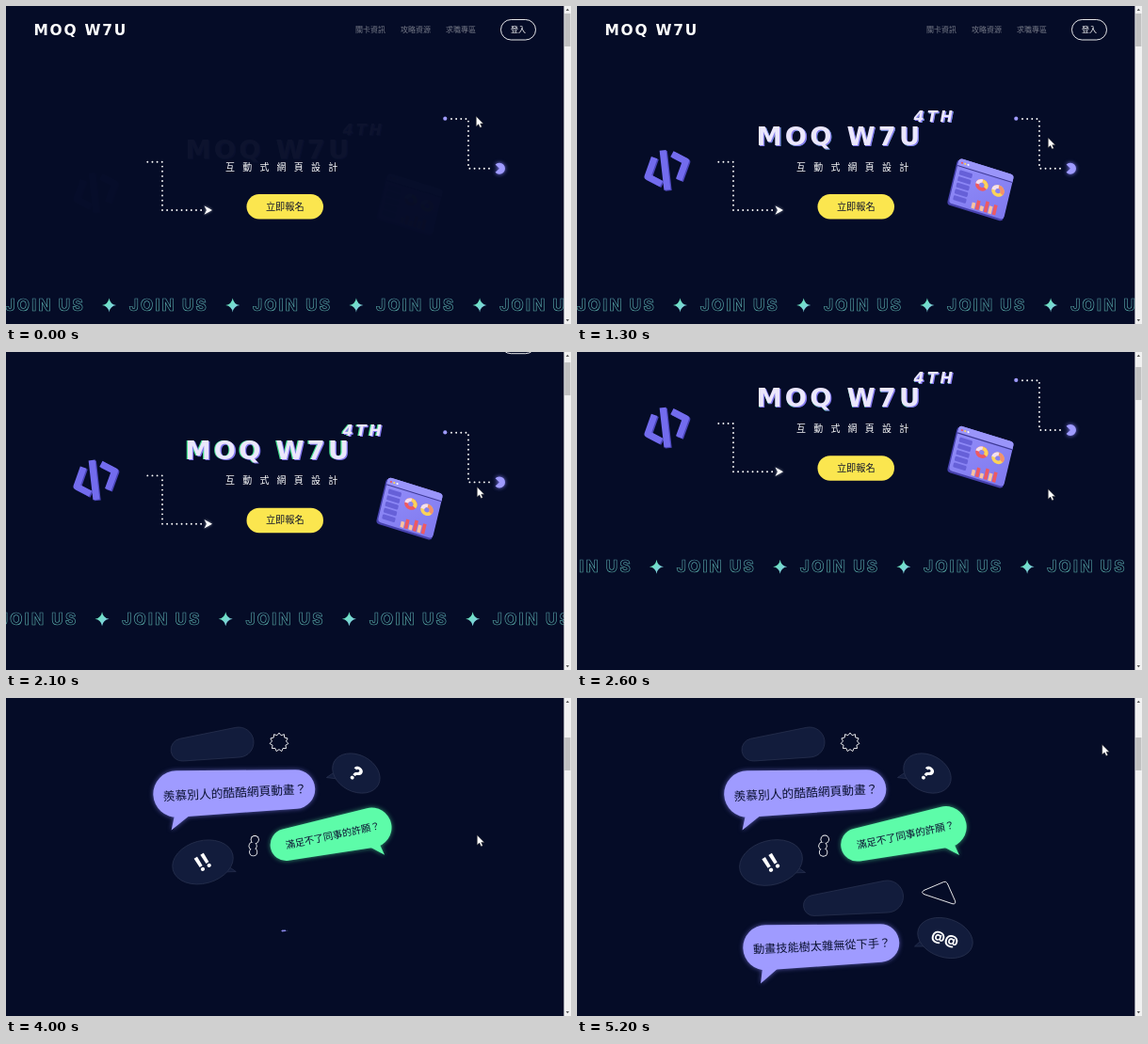
Recreate the animation shown at these times as an HTML page. Size 600 by 338 pixels, loop 5300 ms.

```html
<!DOCTYPE html>
<html lang="zh-Hant">
<head>
<meta charset="utf-8">
<title>互動式網頁設計</title>
<style>
  html, body { margin: 0; width: 100%; height: 100%; overflow: hidden; background: #050c27; }
  svg { display: block; width: 600px; height: 338px; }
  text { font-family: "Noto Sans CJK TC", "Noto Sans CJK", "Noto Sans CJK JP", sans-serif; }
  .wide, .wide text { font-family: "DejaVu Sans", sans-serif; font-weight: 700; }
  .join { font: 800 17px Inter, sans-serif; letter-spacing: 2.3px; fill: none; stroke: url(#edge); stroke-width: .65; }
  .mid { text-anchor: middle; }
  .nav { font-size: 8px; fill: #777b89; }
  .mark { font-family: Inter, sans-serif; font-weight: 800; fill: #fff; text-anchor: middle; }
  .grey { fill: #121c3c; stroke: #27304e; stroke-width: .8; }
  .line { fill: none; stroke: #fff; stroke-width: .9; stroke-linejoin: round; }
  .dots { fill: none; stroke: #fff; stroke-width: 1.9; stroke-linecap: round; stroke-dasharray: 0 5.15; }
  .violet { fill: #9f9bff; filter: drop-shadow(0 0 2.5px #807cf0aa); }
  .green { fill: #5dfca9; filter: drop-shadow(0 0 2.5px #45d890aa); }
  .say { fill: #0b1232; text-anchor: middle; font-weight: 400; }
  .code { fill: none; stroke-width: 7; stroke-linecap: square; stroke-linejoin: round; }
</style>
</head>
<body>
<svg viewBox="0 0 600 338">
  <defs>
    <linearGradient id="mint" x1="0" y1="0" x2="1" y2="1">
      <stop offset="0" stop-color="#5cf0ac"/><stop offset="1" stop-color="#8fc4f2"/>
    </linearGradient>
    <linearGradient id="edge" x1="0" y1="0" x2="0" y2="1">
      <stop offset="0" stop-color="#4f929f"/><stop offset="1" stop-color="#5bb5ab"/>
    </linearGradient>
    <linearGradient id="iris" x1="0" y1="0" x2="1" y2="1">
      <stop offset="0" stop-color="#938efa"/><stop offset="1" stop-color="#7f79ee"/>
    </linearGradient>
    <path id="brackets" d="M81 164.5L75 181.5L86.5 187.5M104 159L115.5 165L109.5 181.5M91.5 157L95.5 192"/>
    <g id="name" class="wide">
      <text x="190.5" y="148.2" font-size="27.3" letter-spacing="3.2">MOQ W7U</text>
      <text x="357.5" y="123.2" font-size="16" font-style="italic" letter-spacing="3">4TH</text>
    </g>
  </defs>

  <g id="page">
    <text class="wide" x="29.5" y="31" font-size="15.4" letter-spacing="1.8" fill="#fff">MOQ W7U</text>
    <text class="nav" x="371" y="28.3">關卡資訊</text>
    <text class="nav" x="419" y="28.3">攻略資源</text>
    <text class="nav" x="467" y="28.3">求職專區</text>
    <rect x="525.5" y="14.5" width="37" height="21.5" rx="10.75" class="line"/>
    <text class="mid" x="544" y="28.3" font-size="8" fill="#fff">登入</text>

    <g id="title">
      <use href="#name" id="ghostA" fill="#46e08e"/>
      <use href="#name" id="ghostB" fill="#8478ee"/>
      <use href="#name" fill="#ebe7fc"/>
    </g>
    <text x="233" y="174.7" font-size="10" font-weight="500" letter-spacing="8.2" fill="#fff">互動式網頁設計</text>
    <rect x="255.5" y="200" width="81.5" height="26.5" rx="13.25" fill="#fbe64f"/>
    <text class="mid" x="296.3" y="216.7" font-size="10.2" font-weight="500" fill="#10152c">立即報名</text>

    <path class="dots" d="M150.3 165.7H166V217H209"/>
    <path d="M210.5 212.3L219 217L210.5 221.7L213 217Z" fill="#fff" style="filter:drop-shadow(0 0 1.5px #fff8)"/>
    <path class="dots" d="M473 120H491V172.7H516"/>
    <circle cx="466.3" cy="119.7" r="2.1" fill="#9f9bff"/>
    <path d="M524 172.7L519.6 168.6A6 6 0 1 1 519.6 176.8Z" fill="#9f9bff" style="filter:drop-shadow(0 0 2px #7f7af0)"/>

    <g id="codeIcon" class="code">
      <use href="#brackets" x="1.3" y="1" stroke="#4a45b8"/>
      <use href="#brackets" stroke="#736cee"/>
    </g>
    <g id="windowIcon"><g id="panel" transform="matrix(.97 .3 -.21 .88 406 161.5)">
      <rect x="-1.5" y="1.5" width="61" height="55" rx="4" fill="#4742ae"/>
      <rect width="60" height="54" rx="4" fill="url(#iris)"/>
      <path d="M0 9V4A4 4 0 0 1 4 0H56A4 4 0 0 1 60 4V9Z" fill="#9a95fa"/>
      <path d="M0 9H60" stroke="#3d3996" stroke-width="1.2"/>
    </g></g>

    <g id="marquee"></g>
  </g>

  <g id="row0"></g><g id="row1"></g><g id="row2"></g>

  <rect x="592.4" width="7.6" height="338" fill="#f1f1f1"/>
  <path d="M594.6 5L596.3 2.8L598 5ZM594.6 333L596.3 335.2L598 333Z" fill="#555"/>
  <rect id="thumb" x="593.2" y="8" width="6.2" height="35" fill="#c1c1c1"/>
  <path id="cursor" d="M0 0V10.6L2.5 8.4L4.2 12L6 11.2L4.4 7.7H7.6Z" fill="#fff" stroke="#222" stroke-width=".5"/>
</svg>

<script>
const LOOP = 5300;
const $ = id => document.getElementById(id);
const add = (id, html) => $(id).insertAdjacentHTML('beforeend', html);
const move = (id, x, y) => $(id).setAttribute('transform', `translate(${x} ${y})`);

// Outline around two circles joined by their outer tangents.
function capsule(x1, y1, r1, x2, y2, r2) {
  const a = Math.atan2(y2 - y1, x2 - x1);
  const b = Math.acos((r1 - r2) / Math.hypot(x2 - x1, y2 - y1));
  const at = (x, y, r, k) => `${x + r * Math.cos(k)} ${y + r * Math.sin(k)}`;
  return `M${at(x1, y1, r1, a - b)}L${at(x2, y2, r2, a - b)}` +
    `A${r2} ${r2} 0 ${+(r2 > r1)} 1 ${at(x2, y2, r2, a + b)}` +
    `L${at(x1, y1, r1, a + b)}A${r1} ${r1} 0 ${+(r1 > r2)} 1 ${at(x1, y1, r1, a - b)}Z`;
}

const star = (x, y, points, outer, inner) => 'M' + Array.from({ length: points * 2 }, (_, i) => {
  const r = i % 2 ? inner : outer, a = i * Math.PI / points - Math.PI / 2;
  return `${x + r * Math.cos(a)} ${y + r * Math.sin(a)}`;
}).join('L') + 'Z';

const path = (cls, d) => `<path class="${cls}" d="${d}"/>`;
const label = (cls, x, y, size, angle, str) =>
  `<text class="${cls}" font-size="${size}" transform="translate(${x} ${y}) rotate(${angle})" y="${size * .37}">${str}</text>`;
const speech = (cls, ends, tail, ...text) =>
  `<g class="${cls}"><path d="${capsule(...ends)}"/><path d="${tail}"/></g>` + label('say', ...text);
const thought = (x, y, rx, ry, angle, tail, size, turn, str) => path('grey', tail) +
  `<ellipse class="grey" rx="${rx}" ry="${ry}" transform="translate(${x} ${y}) rotate(${angle})"/>` +
  label('mark', x, y, size, turn, str);

add('row0',
  path('grey', capsule(187, 55, 12, 247, 47, 16)) +
  path('line', star(290, 47, 11, 10, 7.6)) +
  thought(372, 80, 26.5, 19.5, 27, 'M350 78L340.5 84.5L352 86Z', 21, 38, '?') +
  speech('violet', [181, 102, 24.8, 307.5, 97, 20.8], 'M179 124L175.5 140.5L196 124Z',
    243, 100.5, 12.75, -3, '羨慕別人的酷酷網頁動畫？'));

const worm = [[263.2, 150.3], [261, 157.2], [261.6, 164]];
const blobs = (r, fill) => worm.map(([x, y]) => `<circle cx="${x}" cy="${y}" r="${r}" fill="${fill}"/>`).join('');
add('row1',
  thought(206, 175, 34, 23.5, -15, 'M233 179L242.5 185.5L226 186Z', 23, -32, '!!') +
  blobs(4.7, '#fff') + blobs(3.8, '#050c27') +
  speech('green', [297.8, 156, 17.6, 391.7, 137, 22], 'M385 156L406 167L400 154Z',
    349, 145.5, 10.6, -12, '滿足不了同事的許願？'));

add('row2',
  path('grey', capsule(251.5, 220.5, 11, 329.5, 211, 17)) +
  path('line', 'M368 204.6L389.5 195.5Q392 194.6 393.3 197L401.6 215.8Q402.4 219.2 399 218.8L368 208.4Q365 206.4 368 204.6Z') +
  thought(391, 255, 30, 20.5, 18, 'M366 257L358.5 264L370 264Z', 14, 17, '@@') +
  speech('violet', [200.3, 265.3, 24, 322, 260.5, 20.3], 'M197 287L195 303.5L215 286Z',
    260, 263.5, 12.2, -2.8, '動畫技能樹太雜無從下手？'));

// Dashboard details
let parts = '';
for (let i = 0; i < 3; i++) parts += `<circle cx="${4 + i * 3.4}" cy="4.5" r="1.1" fill="${['#f0575f', '#fbd35a', '#fff'][i]}"/>`;
for (let i = 0; i < 5; i++) parts += `<rect x="3.5" y="${13 + i * 7.6}" width="14" height="5.6" rx="1.2" fill="#6660d8"/>`;
[[29.5, 22.5, '#ee5a62', '#fbd35a'], [47.3, 23.5, '#fbd35a', '#f4916a']].forEach(([x, y, a, b]) => {
  parts += `<g fill="none" stroke-width="4" transform="translate(${x} ${y})"><circle r="4.8" stroke="${a}"/>` +
    `<path d="M0-4.8A4.8 4.8 0 0 1 4.2 2.3" stroke="${b}"/><path d="M-4.8 0A4.8 4.8 0 0 1 0-4.8" stroke="#f3dff0"/></g>`;
});
[7, 11, 6, 13, 9, 12].forEach((h, i) => {
  parts += `<rect x="${24 + i * 4.6}" y="${52 - h}" width="3.6" height="${h}" fill="${i % 2 ? '#ee5a62' : '#fbc3a0'}"/>`;
});
add('panel', parts);

for (let i = 0; i < 7; i++) {
  const x = i * 131.2;
  add('marquee', `<text class="join" x="${x - .5}" y="324">JOIN US</text>` +
    `<path d="M${x + 109.5} 310.5q1 6.5 7.5 7.5q-6.5 1-7.5 7.5q-1-6.5-7.5-7.5q6.5-1 7.5-7.5Z" fill="url(#mint)"/>`);
}

// Linear interpolation through [time, value] stops.
function track(t, stops) {
  if (t <= stops[0][0]) return stops[0][1];
  for (let i = 1; i < stops.length; i++) {
    const [t0, v0] = stops[i - 1], [t1, v1] = stops[i];
    if (t < t1) return v0 + (v1 - v0) * (t - t0) / (t1 - t0);
  }
  return stops[stops.length - 1][1];
}

const clamp = v => Math.min(1, Math.max(0, v));
const smooth = v => v * v * (3 - 2 * v);
const elastic = p => p <= 0 ? 0 : p >= 1 ? 1 : 1 - 2 ** (-10 * p) * Math.cos(4 * Math.PI * p);

const SCROLL = [[1750, 0], [1800, 2], [2100, 34.2], [2400, 64], [2600, 89.4], [2700, 125], [2800, 205], [2900, 315], [3000, 380]];
const CURSOR_X = [[200, 499.3], [800, 500.3], [4250, 500.3], [4600, 550], [4800, 553.5], [5000, 557.7]];
const CURSOR_Y = [[100, 117.3], [800, 140], [1500, 140], [2100, 143.5], [2500, 145.7], [4250, 145.7], [4600, 41], [4800, 50], [5000, 49.5]];
const ROWS = [[3058, 276, 86], [3520, 293, 158], [3997, 296, 247]];

function draw(t) {
  const scroll = track(t, SCROLL);
  move('page', 0, -scroll);
  move('thumb', 0, scroll * 34 / 380);
  move('marquee', -(scroll * .18 + scroll * scroll * .0011), 0);
  move('cursor', track(t, CURSOR_X), track(t, CURSOR_Y));

  const intro = clamp(t / 1000);
  const rise = (1 - intro) ** 2;
  const float = smooth(clamp((t - 1200) / 1100));
  move('title', 0, 14 * rise);
  move('codeIcon', 0, 24 * rise - 4.6 * float);
  move('windowIcon', 0, 16 * rise + 6.2 * float);
  $('title').style.opacity = .03 + .97 * (1 - rise);
  $('codeIcon').style.opacity = $('windowIcon').style.opacity = .01 + .99 * (1 - rise);

  const shake = Math.cos((t - 1300) / 255);
  move('ghostA', 1.2 * shake, .5 + .5 * shake);
  move('ghostB', 1.3, 1);

  ROWS.forEach(([start, x, y], i) => {
    const s = elastic((t - start) / 1000);
    const row = $('row' + i);
    row.style.display = s > 0 ? '' : 'none';
    row.setAttribute('transform', `translate(${x} ${y}) scale(${s}) translate(${-x} ${-y})`);
  });
}

const begin = performance.now();
function tick() {
  draw((performance.now() - begin) % LOOP);
  requestAnimationFrame(tick);
}
tick();
</script>
</body>
</html>
```
